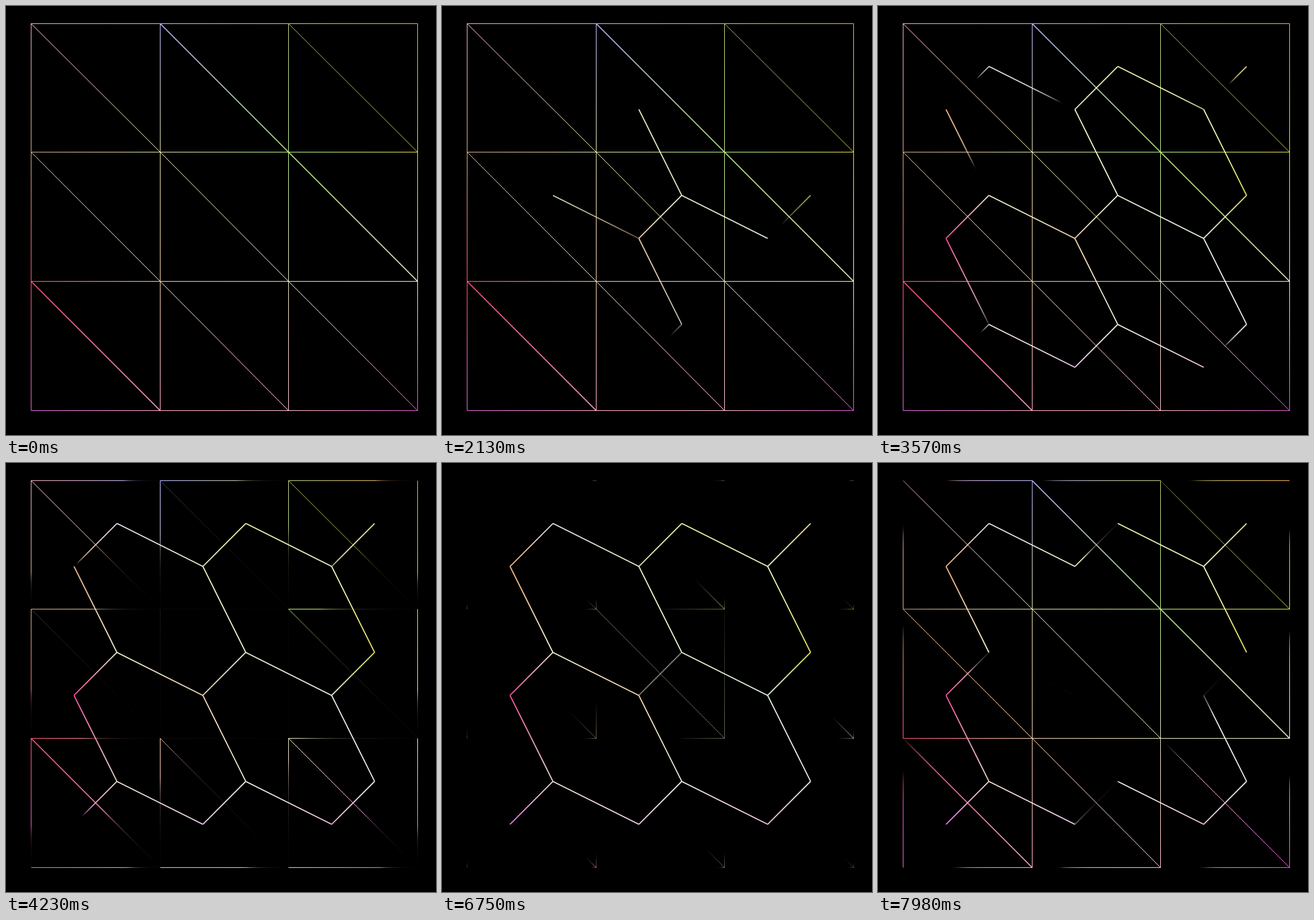
These frames come from a looping animation (573x571 px, 8000 ms). An HTML page with a canvas:

```html
<!DOCTYPE html>
<html lang="en">
<head>
<meta charset="utf-8">
<title>Triangulation and dual</title>
<style>
  html, body { margin: 0; width: 100%; height: 100%; overflow: hidden; background: #000; }
  canvas { display: block; }
</style>
</head>
<body>
<canvas id="stage" width="573" height="571"></canvas>
<script>
const LOOP = 8000;
const FADE = 125;
const STOPS = 24;
const ctx = document.getElementById('stage').getContext('2d');

const X = [33.5, 205.5, 376.5, 548.5];
const Y = [23.5, 194.5, 366.5, 538.5];
const CELL = 171.67;

const rgb = hex => [...hex].map(c => parseInt(c, 16) * 17);
const palette = text => text.split(' ').map(rgb);

// Colours per vertex, row by row: grid corners, then upper and lower triangle centres.
const cornerColors = palette('eab bbf bc7 ea5 ca8 dda be8 dd4 f57 eca ddb eec d6d fac fbc d5c');
const upperColors = palette('eef ffa fe9 ffd efd ee6 fed ffe fff');
const lowerColors = palette('fb8 efc ffc f5a fdb efe f7f fdf fce');

const corner = (c, r) => ({ x: X[c], y: Y[r], color: cornerColors[r * 4 + c] });
const centre = (c, r, dx, dy, colors) => ({
  x: 33.4 + CELL * (c + dx / 3),
  y: 23.2 + CELL * (r + dy / 3),
  color: colors[r * 3 + c]
});
const upper = (c, r) => centre(c, r, 2, 1, upperColors);
const lower = (c, r) => centre(c, r, 1, 2, lowerColors);

// Edge code: h, v or d (diagonal), then column and row of its first corner.
const gridEnds = {
  h: (c, r) => [corner(c, r), corner(c + 1, r)],
  v: (c, r) => [corner(c, r), corner(c, r + 1)],
  d: (c, r) => [corner(c, r), corner(c + 1, r + 1)]
};
const dualEnds = {
  h: (c, r) => [lower(c, r - 1), upper(c, r)],
  v: (c, r) => [upper(c - 1, r), lower(c, r)],
  d: (c, r) => [upper(c, r), lower(c, r)]
};

// Both lists run from the middle outwards; the rank sets each edge's pace.
const inner = 'd11 v21 h11 h12 v11 ';
const ring = ' h22 v22 h21 v12 v20 h02 v10 h01 ';
const gridOrder = inner + 'd10 d01 d21 d12' + ring +
  'd00 d20 d02 d22 h10 v01 v31 h13 h20 v02 v32 h23 h00 v00 v30 h03';
const dualOrder = inner + 'd21 d12 d10 d01' + ring + 'd22 d20 d00 d02';

const build = (order, ends) => order.split(' ').map((code, rank) => {
  const [a, b] = ends[code[0]](+code[1], +code[2]);
  return { code, rank, a, b };
});
const grid = build(gridOrder, gridEnds);
const dual = build(dualOrder, dualEnds);

const boldDiagonals = ['d10', 'd21', 'd02'];
function gridStyle(code) {
  if (code === 'd20') return [1, 0.75];
  if (boldDiagonals.includes(code)) return [1.25, 1];
  return code[0] === 'd' ? [1, 0.95] : [1, 0.88];
}

const rise = age => age <= 0 ? 0 : 1 - Math.exp(-age / FADE);
const fall = age => age <= 0 ? 1 : Math.exp(-age / FADE);

// Time since `start`, with the speed ramping up over `ramp` ms.
function softElapsed(t, start, ramp) {
  const x = Math.max(0, t - start);
  return x < ramp ? x * x / (2 * ramp) : x - ramp / 2;
}

function gridAlpha(t, rank, s) {
  const pass = rank * 63.8 * (1 - s);
  const back = softElapsed(t, 6450, 630);
  return Math.max(fall(t - 3700 - pass), back > 0 ? rise(back - pass) : 0);
}

function dualAlpha(t, rank, s) {
  const drawn = rise(t - 1475 - rank * (95 + 53 * s));
  const gone = softElapsed(t, 6450, 630);
  return gone > 0 ? Math.min(drawn, fall(gone - rank * (120 + 67 * s))) : drawn;
}

function drawEdge({ a, b, rank }, t, alphaAt, width, strength) {
  const paint = ctx.createLinearGradient(a.x, a.y, b.x, b.y);
  let peak = 0;
  for (let i = 0; i <= STOPS; i++) {
    const s = i / STOPS;
    const alpha = alphaAt(t, rank, s) * strength;
    const color = a.color.map((v, n) => Math.round(v + (b.color[n] - v) * s));
    paint.addColorStop(s, `rgba(${color},${alpha.toFixed(4)})`);
    peak = Math.max(peak, alpha);
  }
  if (peak < 0.015) return;
  ctx.strokeStyle = paint;
  ctx.lineWidth = width;
  ctx.beginPath();
  ctx.moveTo(a.x, a.y);
  ctx.lineTo(b.x, b.y);
  ctx.stroke();
}

function render(t) {
  ctx.fillStyle = '#000';
  ctx.fillRect(0, 0, 573, 571);
  for (const edge of grid) drawEdge(edge, t, gridAlpha, ...gridStyle(edge.code));
  for (const edge of dual) drawEdge(edge, t, dualAlpha, 1.4, 1);
}

const begin = performance.now();
function tick() {
  render((performance.now() - begin) % LOOP);
  requestAnimationFrame(tick);
}
tick();
</script>
</body>
</html>
```
